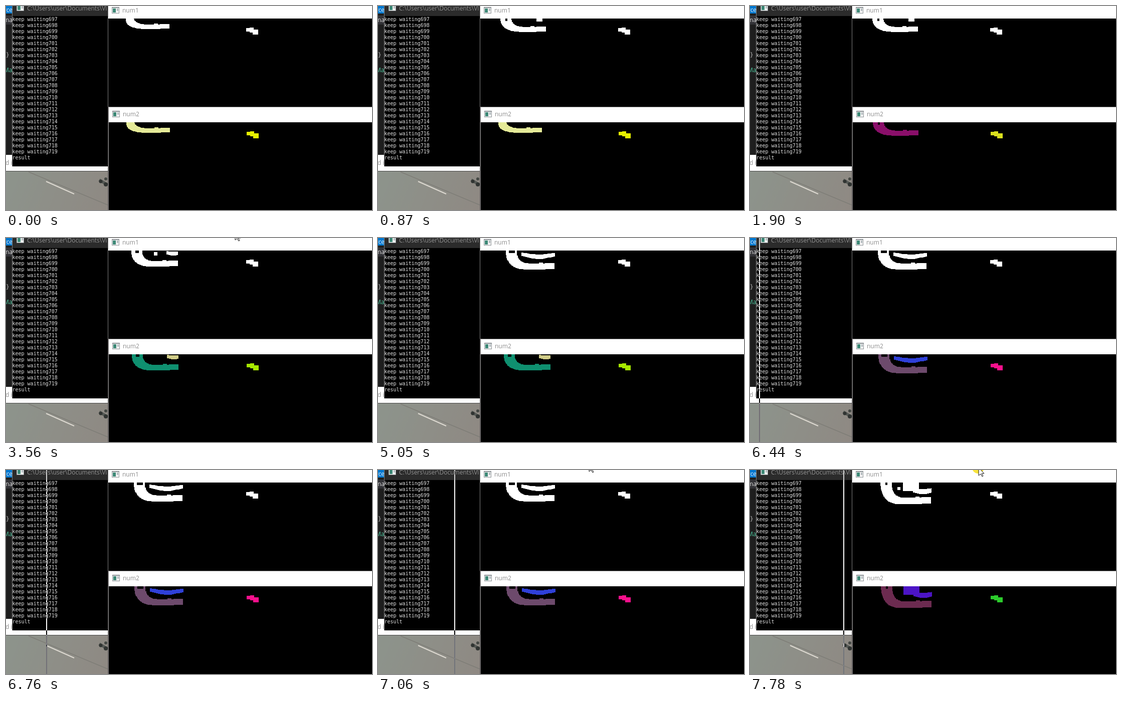
An HTML page with a canvas that plays this animation: 730x407 px, repeating every 8 s.

```html
<!DOCTYPE html>
<html lang="en">
<head>
<meta charset="utf-8">
<title>Blob tracking</title>
<style>
html, body { margin: 0; width: 100%; height: 100%; overflow: hidden; background: #000; }
canvas { display: block; }
</style>
</head>
<body>
<canvas id="stage" width="730" height="407"></canvas>
<script>
const ctx = document.getElementById('stage').getContext('2d');
const LOOP = 8000;
const UI = '12px "Open Sans", "Noto Sans", sans-serif';
const MONO = '10px "DejaVu Sans Mono", "Noto Sans Mono", monospace';
const BORDER = '#808080';

// Boxes are [x, y, width, height]; "extra" shows in the mask only.
const STAGES = [
  { slot: 0 },
  { slot: 4, extra: [316, 25, 12, 6] },
  { slot: 7, patch: [320, 26, 23, 7], extra: [295, 28, 7, 7] },
  { slot: 12, patch: [286, 29, 67, 7] },
  { slot: 4, patch: [325, 36, 37, 9], block: [305, 25, 32, 17], extra: [294, 34, 6, 6] }
];
const COLORS = [
  { arm: '#e5ea98', blob: '#e6f000' },
  { arm: '#8a0f6a', blob: '#dae01e' },
  { arm: '#0f9070', patch: '#d0cc88', blob: '#a6e800' },
  { arm: '#6d4a6c', patch: '#2f40d8', blob: '#f8108c' },
  { arm: '#6c2b50', patch: '#4c14c6', blob: '#2ccc2c' }
];
const WHITE = { arm: '#fff', patch: '#fff', blob: '#fff' };

// Times at which the mask, the labels and their colours advance.
const MASK_AT = [700, 3000, 4500, 7400];
const LABEL_AT = [1000, 3160, 5170, 7700];
const COLOR_AT = [1800, 3480, 5920, 7780];

const stepAt = (times, t) => times.filter(x => t >= x).length;
const ramp = (t, a, b) => Math.min(1, Math.max(0, (t - a) / (b - a)));
const mix = (a, b, p) => a + (b - a) * p;

function rect(x, y, w, h, color) {
  ctx.fillStyle = color;
  ctx.fillRect(Math.round(x), Math.round(y), Math.round(w), Math.round(h));
}

function disc(x, y, r, color) {
  ctx.fillStyle = color;
  ctx.beginPath();
  ctx.arc(x, y, r, 0, Math.PI * 2);
  ctx.fill();
}

function text(s, x, y, color, font = UI) {
  ctx.font = font;
  ctx.fillStyle = color;
  ctx.fillText(s, x, y);
}

function stroke(x1, y1, x2, y2, color, width) {
  ctx.strokeStyle = color;
  ctx.lineWidth = width;
  ctx.beginPath();
  ctx.moveTo(x1, y1);
  ctx.lineTo(x2, y2);
  ctx.stroke();
}

function icon(x, y) {
  rect(x, y, 15, 13, '#8c9296');
  rect(x + 1, y + 2, 13, 10, '#f4f4f4');
  rect(x + 2, y + 3, 6, 8, '#3d8876');
  rect(x + 10, y + 3, 3, 5, '#b4bcc0');
}

function drawEditor() {
  rect(0, 0, 13, 297, '#1e1e1e');
  rect(0, 0, 13, 15, '#0078d0');
  rect(0, 19, 13, 18, '#333337');
  text('rce', -4, 12, '#e4f0fa');
  text('ma', -5, 32, '#dcdcdc');
  text('}', 1, 101, '#c8c8c8');
  text('Ma', -5, 132, '#4ec9a0');
  rect(0, 297, 203, 32, '#fff');
  text('d i', -1, 317, '#909090');
}

function drawPhoto() {
  const road = ctx.createLinearGradient(0, 330, 203, 407);
  road.addColorStop(0, '#8d948c');
  road.addColorStop(1, '#8f8983');
  rect(0, 329, 203, 1, '#454545');
  rect(0, 330, 203, 77, road);
  stroke(45, 331, 203, 397, '#7e7d77', 1.5);
  stroke(80, 350, 136, 375, '#dcd8d0', 2.2);
  stroke(186, 347, 203, 357, '#565a56', 6);
  disc(189, 350, 3.5, '#303432');
  disc(199, 356, 4, '#303432');
  disc(199, 345, 3, '#444844');
}

function drawConsole() {
  rect(12, 0, 191, 320, '#000');
  rect(13, 0, 190, 20, '#2b2b2b');
  rect(12, 0, 1, 320, BORDER);
  icon(21, -3);
  text('C:\\Users\\user\\Documents\\Vi', 42, 9, '#949494');
  for (let i = 0; i < 24; i++) {
    const line = i < 23 ? 'keep waiting' + (697 + i) : 'result';
    text(line, 12.5, 30 + i * 12, '#e2e2e2', MONO);
  }
}

// A curved arm of square stamps that drifts right and down with each stage.
function drawArm(n, slot, color) {
  const left = 239 + 5.3 * n, right = 326 + 8.7 * n;
  const h = 9 + 0.9 * n, leg = Math.min(16 + 6 * n, 22);
  const mid = 46 + 5.5 * n - h / 2, x0 = left + leg / 2, x1 = left + 45;
  for (let p = 0; p <= 1; p += 0.05) {
    const w = mix(leg, h, p);
    const x = mix(x0, x1, p * p), y = mix(mid, 25, (1 - p) ** 2);
    rect(x - w / 2, y - h / 2, w, h, color);
  }
  const top = mid - h / 2;
  rect(x1 - 4, top, right - x1 - 14, h, color);
  rect(right - 19, top - 1, 19, h, color);
  rect(right - 31, top - 2, 8, 4, color);
  rect(x0 - slot / 2 + 1, 25, slot, 5, '#000');
}

function drawPatch([x, y, w, h], color) {
  for (let i = 0; i < w; i += 4) {
    const sag = w / 18 * Math.sin(Math.PI * i / w);
    rect(x + i, y + sag, Math.min(4, w - i), h + sag / 2, color);
  }
}

function drawBlobs(n, colors, isMask) {
  const { slot, patch, block, extra } = STAGES[n];
  drawArm(n, slot, colors.arm);
  if (patch) drawPatch(patch, colors.patch || colors.arm);
  if (block) rect(...block, colors.patch || colors.arm);
  if (extra && isMask) rect(...extra, '#fff');
  rect(479, 44, 12, 7, colors.blob);
  rect(486, 43, 8, 10, colors.blob);
  rect(492, 47, 11, 10, colors.blob);
}

function drawWindow(name, x, y) {
  rect(x, y, 527, 31, '#fff');
  rect(x, y, 527, 1, BORDER);
  rect(x, y, 1, 407, BORDER);
  icon(x + 8, y + 8);
  text(name, x + 29, y + 19, '#8c8c8c');
}

function drawWindows(t) {
  rect(203, 0, 527, 407, '#000');
  drawBlobs(stepAt(MASK_AT, t), WHITE, true);
  drawWindow('num1', 203, -6);

  rect(203, 201, 527, 206, '#000');
  rect(203, 201, 1, 206, '#5a5556');
  ctx.save();
  ctx.translate(1, 207);
  drawBlobs(stepAt(LABEL_AT, t), COLORS[stepAt(COLOR_AT, t)], false);
  ctx.restore();
  drawWindow('num2', 204, 201);
}

// Selection line inverts whatever lies beneath it and moves in ticks.
function drawLine(t) {
  if (t < 6200) return;
  const tick = t - (t - 6200) % 70;
  const x = 3 + 150 * ramp(tick, 6200, 7040) ** 1.6 + 34 * ramp(tick, 7180, 7530);
  ctx.globalCompositeOperation = 'difference';
  rect(x - 1, 0, 2, 407, '#fff');
  ctx.globalCompositeOperation = 'source-over';
}

function drawCursor(t) {
  const firstVisit = t >= 3490 && t < 4340;
  if (!firstVisit && t < 7060) return;
  const p = ramp(t, 7240, 7550);
  const x = firstVisit ? 457 : mix(421, 456, p);
  const y = firstVisit ? -12 : mix(-13, -5, p);
  if (t >= 7700) disc(x - 1, y, 12, '#f8e43c');
  const arrow = new Path2D('M0 0V16L4 13L7 18L9 17L6 12H11Z');
  ctx.save();
  ctx.translate(x, y);
  ctx.fillStyle = '#fff';
  ctx.fill(arrow);
  ctx.strokeStyle = '#111';
  ctx.lineWidth = 1;
  ctx.stroke(arrow);
  ctx.restore();
}

function draw(t) {
  drawEditor();
  drawPhoto();
  drawConsole();
  drawWindows(t);
  drawLine(t);
  drawCursor(t);
}

const start = performance.now();
function frame() {
  draw((performance.now() - start) % LOOP);
  requestAnimationFrame(frame);
}
frame();
</script>
</body>
</html>
```
